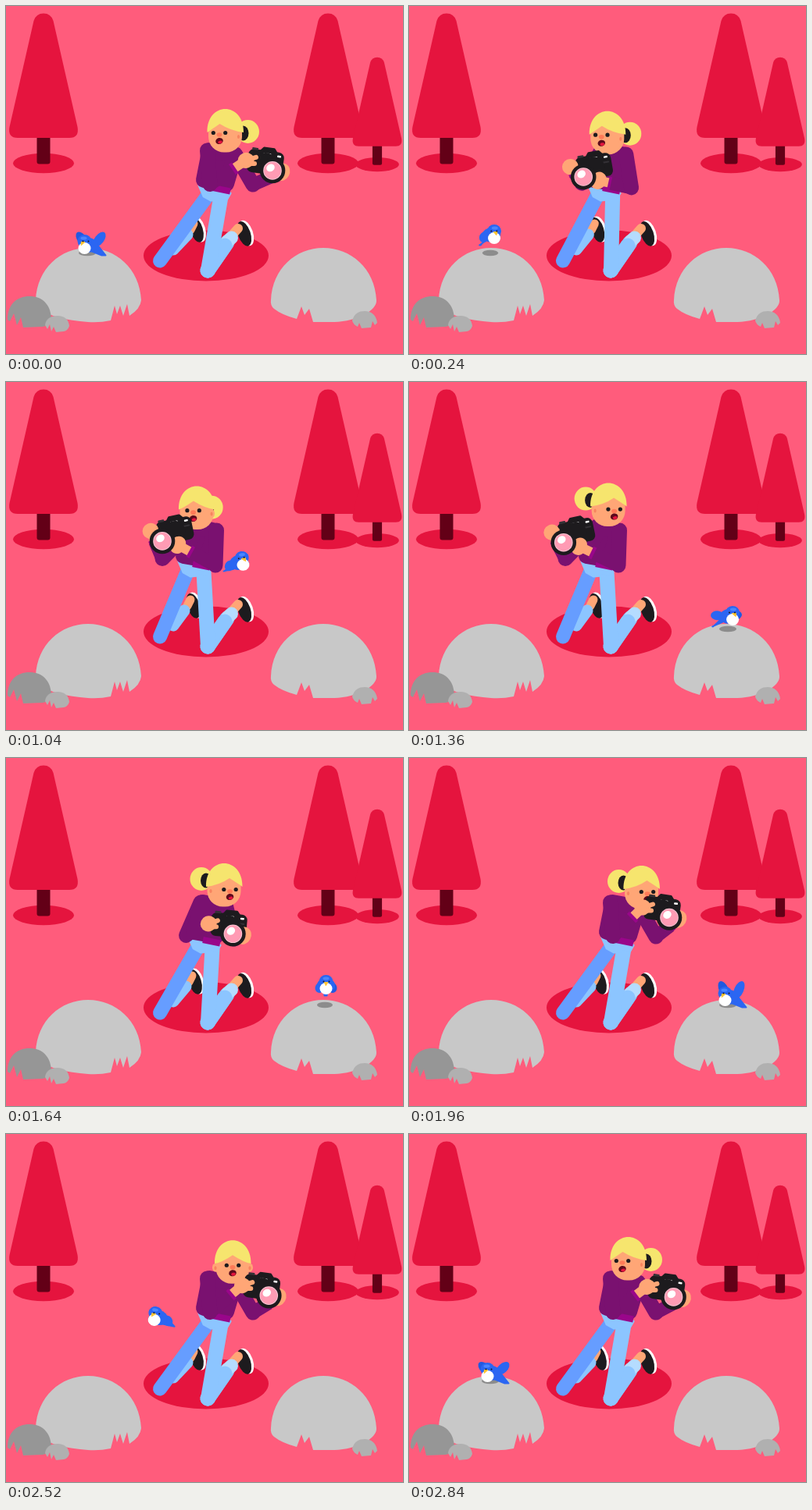
An HTML page with a canvas for the animation above (2.88 s loop, 508 by 446 pixels).

```html
<!DOCTYPE html>
<html lang="en">
<head>
<meta charset="utf-8">
<title>Bird watcher</title>
<style>
html, body { margin: 0; width: 100%; height: 100%; overflow: hidden; background: #ff5c7c; }
canvas { display: block; width: 508px; height: 446px; }
</style>
</head>
<body>
<canvas id="stage"></canvas>
<script>
const W = 508, H = 446, LOOP = 2880, HALF = LOOP / 2, STEP = 40, AXIS = 268;
const RED = '#e5143e', TRUNK = '#630017', PURPLE = '#7a1170', MAGENTA = '#99068a';
const DENIM = '#669dff', SKY = '#8cc5ff', CUFF = '#b5dcff', SKIN = '#ffa676', HAIR = '#f6e56e';
const BLACK = '#1d1b1e', BLUE = '#2b66f2';

const canvas = document.getElementById('stage');
const ctx = canvas.getContext('2d');
const dpr = window.devicePixelRatio || 1;
canvas.width = W * dpr;
canvas.height = H * dpr;

// Timing helpers
const clamp = v => Math.min(1, Math.max(0, v));
const lerp = (a, b, u) => a + (b - a) * u;
const ease = (t, from, to) => (1 - Math.cos(Math.PI * clamp((t - from) / (to - from)))) / 2;
const bump = (t, from, to) => Math.sin(Math.PI * clamp((t - from) / (to - from)));
function keyed(t, keys) {
  let i = 1;
  while (i < keys.length - 1 && t > keys[i][0]) i++;
  const [t0, a] = keys[i - 1], [t1, b] = keys[i];
  return lerp(a, b, clamp((t - t0) / (t1 - t0)));
}

// Drawing helpers
function fill(color, build) {
  ctx.fillStyle = color;
  ctx.beginPath();
  build();
  ctx.fill();
}
const oval = (color, x, y, rx, ry = rx, turn = 0) =>
  fill(color, () => ctx.ellipse(x, y, rx, ry, turn, 0, 7));
const box = (color, x, y, w, h, r) => fill(color, () => ctx.roundRect(x, y, w, h, r));
const shape = (color, d) => { ctx.fillStyle = color; ctx.fill(new Path2D(d)); };
function poly(color, points, round = 0) {
  fill(color, () => { points.forEach(p => ctx.lineTo(...p)); ctx.closePath(); });
  if (round) {
    ctx.strokeStyle = color;
    ctx.lineWidth = round;
    ctx.lineJoin = 'round';
    ctx.stroke();
  }
}
function limb(color, width, points, cap = 'round') {
  ctx.strokeStyle = color;
  ctx.lineWidth = width;
  ctx.lineCap = cap;
  ctx.lineJoin = 'round';
  ctx.beginPath();
  points.forEach(p => ctx.lineTo(...p));
  ctx.stroke();
}
function at(x, y, draw, turn = 0, scale = 1) {
  ctx.save();
  ctx.translate(x, y);
  ctx.rotate(turn);
  ctx.scale(scale, scale);
  draw();
  ctx.restore();
}
const between = (a, b, u) => [lerp(a[0], b[0], u), lerp(a[1], b[1], u)];

function tree() {
  oval(RED, 0, 201.5, 39, 12.7);
  box(TRUNK, -8.5, 160, 17, 42.5, [0, 0, 3, 3]);
  shape(RED, 'M-12.5 19Q-9.5 9.5 0 9.5T12.5 19L43.5 155Q46 169 33 169H-33Q-46 169 -43.5 155Z');
}

function scenery() {
  ctx.fillStyle = '#ff5c7c';
  ctx.fillRect(0, 0, W, H);
  at(48, 0, tree);
  at(412, 0, tree);
  at(475, 59, tree, 0, 0.715);
  oval(RED, 256, 320, 80, 32.5);
  shape('#c8c8c8', 'M38 377C40 336 70 310 105 310S171 336 173 377Q172 388 158 397L155 382L150 397L146 384L142 395L139 384L134 403Q120 406 105 405Q62 402 42 388Q37 385 38 377Z');
  shape('#c8c8c8', 'M339 377C341 336 371 310 406 310S472 336 474 377C475 390 450 404 420 405L393 405L388 388L382 396L378 385L372 401Q353 396 343 388Q338 384 339 377Z');
  shape('#969696', 'M2 402C2 382 14 372 30 372S57 382 58 400Q56 410 47 411L22 412L19 399L14 409L10 394L5 404Z');
  shape('#b0b0b0', 'M50 409C51 401 57 397 66 397S80 402 81 410Q79 416 74 417L64 418L61 411L58 417L56 408L53 414Z');
  shape('#b0b0b0', 'M443 403C446 394 451 391 459 391S474 396 475 406L472 409L469 404L467 412L455 413L452 406L450 411Q444 408 443 403Z');
}

function shoe(x, y, turn) {
  at(x, y, () => {
    oval('#fff', 1.5, 0, 8.5, 17);
    oval(BLACK, -1.2, 0, 8, 16.5);
  }, turn);
}

function legs(hip, lean) {
  const shift = lean * 2;
  shoe(243 + shift, 286.5, -0.3);
  limb(SKIN, 11, [[234 + shift, 287], [238 + shift, 279]]);
  limb(SKY, 15, [[214, 312], [230 + shift, 293]]);
  shoe(306, 291.5, -0.33);
  limb(SKIN, 12, [[289, 294], [297, 285]]);
  limb(DENIM, 18, [[hip - 9, 243], [197, 326.5]]);
  limb(SKY, 19, [[258, 339], [283, 303]]);
  limb(CUFF, 17, [[284, 301], [288.5, 297]]);
  limb(SKY, 19, [[258, 339], [280, 307]]);
  limb(SKY, 19, [[hip + lerp(12, 8, (lean + 1) / 2), 244], [258.5, 339]]);
  poly(SKY, [[hip - 20, 230], [hip + 20, 240], [hip + 16, 247], [hip - 5, 249], [hip - 14, 244]], 3);
}

function torso(hip, b) {
  const left = 249 + 8.5 * b, right = 281.5 + 12.5 * b;
  poly(PURPLE, [[left + 3, 185], [right - 1, 191], [hip + 15, 228], [hip - 14, 223]], 20);
  limb(MAGENTA, 8, [[hip - 2, 233], [hip + 20, 237.5]], 'butt');
}

function sleeve(shoulder, elbow, hand) {
  const wrist = between(elbow, hand, 0.62);
  limb(SKIN, 12, [elbow, hand]);
  limb(MAGENTA, 16, [elbow, between(elbow, hand, 0.7)], 'butt');
  limb(PURPLE, 17, [elbow, wrist], 'butt');
  limb(PURPLE, 19, [shoulder, elbow]);
}

function head(x, y, yaw) {
  at(x, y, () => {
    const side = -yaw * (1.3 - 0.3 * Math.abs(yaw));
    const tailY = -4.5 - 4.5 * yaw;
    oval(HAIR, side * 29, tailY + 1, 14.5, 15);
    oval(BLACK, side * 23, tailY + 3, 7, 9.5);
    box(SKIN, -21.5, -18, 43, 45.5, [18, 18, 20, 20]);
    const part = yaw * 7;
    fill(HAIR, () => {
      ctx.moveTo(-23, 2);
      ctx.bezierCurveTo(-24, -38, 24, -38, 23.5, 2);
      ctx.quadraticCurveTo(part + 14, 0, part, -9);
      ctx.quadraticCurveTo(part - 13, 0, -23, 2);
    });
    for (const s of [-1, 1]) {
      if (s * yaw < 0.3) {
        const ex = s * 22 + 5 * yaw;
        oval(SKIN, ex, 7, 4, 5.5);
        oval('#f7845f', ex, 7.5, 1.6, 2.5);
      }
    }
    const fx = yaw * 7.5, ey = 4 + 1.5 * yaw;
    oval(BLACK, fx - 7.7, ey, 2.6);
    oval(BLACK, fx + 7.7, ey, 2.6);
    oval('#ff7b58', fx, ey + 2.5, 3.4, 2.8);
    oval('#5c0a1c', fx, 14 + yaw, 4.8, 4, -0.2);
    oval('#e5143e', fx + 1, 15.5 + yaw, 2.8, 1.9, -0.2);
  });
}

function cameraBody(x, y, c) {
  const cx = x + 3.5 - 12.5 * c, cy = y - 13 + 1.5 * c;
  at(cx, cy, () => {
    poly(BLACK, [[-8, -12], [-4, -17], [9, -17], [13, -12]], 3);
    box(BLACK, -23, -14, 46, 30, 7);
    box('#343136', -19, -16, 8, 3, 1);
    box('#343136', -20, -3, 40, 2, 1);
    box('#fff', -4, -11, 10, 2.5, 1);
    box('#fff', 14, -10, 5, 2.5, 1);
  }, (-2 + 10 * c) * Math.PI / 180);
  limb(BLACK, 27, [[cx, cy + 2], [x, y]]);
}

function lens(x, y) {
  oval(BLACK, x, y, 16.3);
  oval('#ffc6d4', x, y, 11.8);
  oval('#ff9bb4', x, y, 10.8);
  oval('#fff', x - 2.5, y - 3.5, 5.5, 4.7, -0.6);
}

function photographer(t, m) {
  const b = m * lerp(-1, 1, ease(t, 0, 400));
  const hip = 254 + 13 * b;
  const drift = keyed(t, [[520, 0], [1040, 3], [1400, 5.5], [1440, 8]]);
  const swing = ease(t, 0, 320);
  const lx = AXIS + m * (lerp(-73, 65, swing) + drift);
  const ly = lerp(209.4, 203, swing) + 22 * bump(t, 0, 320) + 0.8 * drift + 1.5 * b;
  const c = m * keyed(t, [[0, -1], [200, 0.7], [320, 1]]);
  const hx = AXIS + m * keyed(t, [[0, -12.5], [80, -8], [200, 11], [400, 27], [520, 29.5],
    [960, 28], [1080, 22], [1240, 14], [1400, 12.5]]);
  const hy = 1.5 * b + keyed(t, [[0, 158.5], [200, 163], [520, 164.5], [1060, 163], [1400, 158.5]]);
  const yaw = m * (1 - 2 * ease(t, 980, 1180));

  const u = (c + 1) / 2;
  const handL = [lx + lerp(-15, -34, u), ly - 13];
  const handR = [lx + lerp(20, 12, u), ly + lerp(5, 2, u)];
  const elbowL = [230.5 + 30.5 * b, 227.5 + b];
  const elbowR = [292 + 24 * b, 232 - 3 * b];
  const arms = [
    () => sleeve([249 + 8.5 * b, 185], elbowL, handL),
    () => sleeve([281.5 + 12 * b, 190], elbowR, handR),
  ];
  const near = b >= 0 ? 0 : 1;

  legs(hip, b);
  arms[1 - near]();
  torso(hip, b);
  arms[near]();
  head(hx, hy, yaw);
  cameraBody(lx, ly, c);
  oval(SKIN, ...handR, 10, 11.5, 0.5);
  oval(SKIN, ...handL, 10.5, 10, -0.4);
  limb(SKIN, 6, [handL, [handL[0] + lerp(4, 13, u), handL[1] - 4]]);
  limb(SKIN, 6, [[handL[0], handL[1] + 4], [handL[0] + lerp(3, 11, u), handL[1] + 4]]);
  lens(lx, ly);
}

function bird(t, d) {
  const fly = ease(t, 560, 1380);
  const x = 257.5 + d * (304 * fly - 152);
  const air = bump(t, 560, 1380);
  const hop = bump(t, 80, 320);
  const y = 306.5 - 78 * air - 15 * hop;
  const f = d * lerp(-1, 1, ease(t, 120, 280));
  const flap = 0.55 + 0.4 * Math.cos((t - 940) / 240 * 2 * Math.PI);
  const wing = t > 600 && t < 1380 ? flap
    : keyed(t, [[0, 0.9], [160, 0.1], [240, 0], [440, 0.9], [520, 1], [600, 0.95], [1380, 0.8], [1440, 0.9]]);

  if (air < 0.2) oval('#8c8c8c', 256 + d * (fly < 0.5 ? -152 : 152), 316.5, 11 - hop, 3.8);
  at(x, y, () => {
    const tipY = lerp(13, 7, air);
    poly(BLUE, [[-5 * f - 3, 7], [-19 * f - 2, tipY], [-21 * f + 1, tipY], [-8 * f + 3, -1]], 2);
    const angle = lerp(70, -66, wing) * Math.PI / 180;
    const reach = 4 + 5 * wing * wing;
    for (const s of [-1, 1]) {
      const rx = s * 6 - 3 * f;
      at(rx + s * reach * Math.cos(angle), reach * Math.sin(angle) - 1, () =>
        oval(s === Math.sign(f) ? '#2159e0' : BLUE, 0, 0, reach + 3, 6), s * angle);
    }
    oval(BLUE, 0, 0, 11.5, 9.5);
    oval(BLUE, 5 * f, -5, 9, 8.5);
    oval('#fff', 5 * f, 4, 8, 7.5);
    oval('#4a86ff', 6 * f, -9, 4, 2);
    poly('#ffc531', [[7 * f - 2.5, -4], [7 * f + 2.5, -4], [9 * f, 0]], 1);
    oval(BLACK, 4 * f - 3, -5, 1);
    oval(BLACK, 4 * f + 4, -5, 1);
  }, -0.2 * f * air);
}

function render(now) {
  const time = Math.floor((now % LOOP) / STEP) * STEP;
  const t = time % HALF;
  const firstHalf = time < HALF;
  ctx.setTransform(dpr, 0, 0, dpr, 0, 0);
  scenery();
  photographer(t, firstHalf ? -1 : 1);
  bird(t, firstHalf ? 1 : -1);
}

let start;
function tick(now) {
  start ??= now;
  render(Math.max(0, now - start));
  requestAnimationFrame(tick);
}
render(0);
requestAnimationFrame(tick);
</script>
</body>
</html>
```
